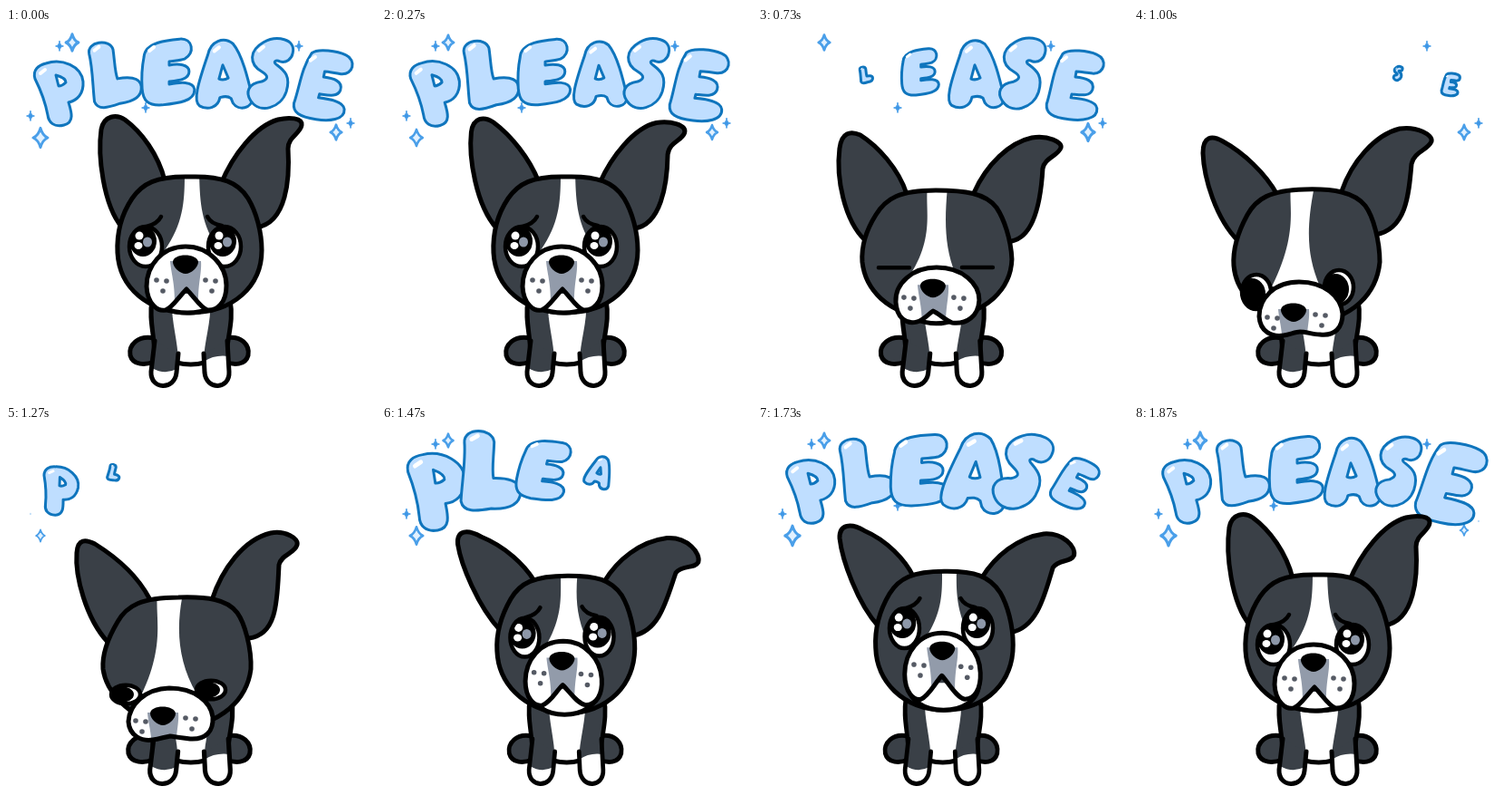
An HTML page with a canvas that plays this animation: 408x408 px, repeating every 1.94 s.

```html
<!DOCTYPE html>
<html lang="en">
<head>
<meta charset="utf-8">
<title>Please</title>
<style>
html, body { margin: 0; width: 100%; height: 100%; overflow: hidden; background: #fff }
canvas { display: block }
</style>
</head>
<body>
<canvas id="stage" width="408" height="408"></canvas>
<script>
const ctx = document.getElementById('stage').getContext('2d');
const LOOP = 1940, STEPS = 29, NUM = /-?[\d.]+/g;
const DARK = '#3a4047', BLUE = '#0f75bd', PALE = '#bfdeff';

// Each pose holds paths and points with matching structure, so any two can be blended.
const up = {
  earL: 'M128 220C107 195 101 140 105 112C108 96 122 95 131 101C150 115 168 140 175 168',
  earR: 'M237 172C250 140 275 108 300 101C312 98 327 99 326 107C325 116 311 120 311 133C313 165 310 215 276 220',
  head: 'M203 164C165 163 150 172 139 188C127 206 122 228 123 248C125 285 155 314 203 314C250 314 282 285 282 245C282 225 276 203 267 188C256 170 238 163 203 164Z',
  blaze: 'M197 160C197 190 196 215 175 245H235C214 215 214 190 213 160Z',
  muzzle: 'M198 241C172 241 155 262 155 285C156 305 168 313 176 311C183 309 191 296 199 288C207 296 215 309 222 311C233 312 243 303 243 284C243 262 224 241 198 241Z',
  chin: 'M161 293C165 321 235 321 239 293',
  nose: '198 260', dots: '172 282 226 282',
  eyes: '154 241 241 241 18 22', pupil: '-3 -6', body: '1'
};
const perk = { ...up,
  earL: 'M125 222C100 195 90 145 92 118C93 101 103 99 115 107C135 122 158 148 170 170',
  earR: 'M243 170C255 145 280 112 305 108C325 106 345 115 341 124C336 133 322 131 319 146C316 180 305 220 280 222'
};
const dip = {
  earL: 'M118 234C95 212 86 165 90 133C92 115 102 113 113 118C132 130 155 155 164 183',
  earR: 'M238 182C252 150 278 126 302 121C320 118 336 126 334 132C331 141 316 143 314 155C312 190 305 230 280 235',
  head: 'M196 179C156 179 141 188 130 206C118 225 114 243 115 258C118 285 140 318 196 320C255 318 279 285 280 255C279 232 271 210 263 198C251 182 228 179 196 179Z',
  blaze: 'M187 175C184 200 195 230 168 272H218C205 240 206 210 209 175Z',
  muzzle: 'M197 264C170 264 151 282 152 302C153 320 164 327 175 324C183 322 188 315 193 312C200 315 205 321 214 325C230 327 243 318 244 300C244 282 226 264 197 264Z',
  chin: 'M165 310C170 331 222 331 230 310',
  nose: '193 286', dots: '167 301 222 301',
  eyes: '150 264 242 264 17 20', pupil: '-3 -2', body: '1.02'
};
const down = {
  earL: 'M115 235C90 210 77 165 76 138C76 119 86 118 98 125C120 137 145 160 158 184',
  earR: 'M229 180C240 148 265 118 293 111C312 108 330 118 328 125C324 135 309 136 306 150C303 185 300 222 266 228',
  head: 'M188 178C150 179 135 188 125 206C113 228 109 248 110 262C112 285 125 312 185 328C245 322 268 290 271 258C271 235 264 208 255 196C243 181 220 177 188 178Z',
  blaze: 'M173 174C170 195 182 225 152 285H205C190 250 190 220 199 174Z',
  muzzle: 'M182 280C155 280 138 298 138 318C139 335 152 341 165 339C172 338 178 335 183 335C190 335 197 338 205 338C222 340 230 330 230 315C228 296 210 280 182 280Z',
  chin: 'M155 320C165 336 205 336 215 320',
  nose: '176 313', dots: '153 323 206 320',
  eyes: '135 291 226 286 16 19', pupil: '-5 2', body: '1'
};
const low = {
  earL: 'M112 238C88 212 76 165 78 140C79 124 88 125 98 130C122 145 145 165 158 190',
  earR: 'M227 192C238 158 262 125 292 118C308 115 323 124 321 131C318 141 304 141 301 153C299 190 300 230 268 234',
  head: 'M190 189C150 189 133 198 123 216C110 238 106 255 107 268C110 290 130 320 183 335C240 330 266 300 270 268C271 245 263 217 255 206C244 191 222 188 190 189Z',
  blaze: 'M167 185C164 210 176 240 150 295H210C190 260 187 225 195 185Z',
  muzzle: 'M180 289C153 290 136 307 135 326C136 342 150 348 162 346C169 345 175 343 181 342C188 343 194 344 203 345C220 346 229 337 228 321C226 304 208 289 180 289Z',
  chin: 'M153 328C163 342 203 342 213 328',
  nose: '173 319', dots: '149 329 204 326',
  eyes: '132 296 226 291 16 19', pupil: '-6 0', body: '1.03'
};
const stretch = {
  earL: 'M135 222C110 195 90 150 85 128C83 112 96 111 112 120C140 130 160 150 170 165',
  earR: 'M250 166C265 145 290 128 320 125C345 124 359 145 356 155C352 162 338 156 330 164C318 190 308 225 280 230',
  head: 'M208 159C172 159 157 167 147 184C135 205 131 226 132 243C133 280 160 312 207 313C255 312 281 280 281 240C281 218 275 196 267 182C255 164 240 159 208 159Z',
  blaze: 'M205 155C205 180 207 200 188 230H234C220 200 220 180 221 155Z',
  muzzle: 'M205 224C180 224 164 245 164 270C164 290 173 300 181 298C190 294 196 280 204 271C212 280 220 296 230 298C241 298 247 285 246 268C245 245 228 224 205 224Z',
  chin: 'M167 280C164 324 248 324 245 280',
  nose: '205 243', dots: '180 262 231 265',
  eyes: '164 217 243 217 16 22', pupil: '-2 -6', body: '.93'
};
const poses = [[0, up], [530, perk], [600, perk], [730, dip], [870, down], [1000, down],
  [1270, low], [1330, low], [1530, stretch], [1610, stretch], [1800, up], [LOOP, up]];
const lids = [[0, 1], [600, 1], [730, 0], [800, 0], [900, 1], [1170, 1], [1270, .55],
  [1335, 0], [1400, 0], [1470, 1], [LOOP, 1]];
const pop = [[0, 0], [30, .25], [110, .75], [190, 1.18], [300, 1.2], [370, 1.02], [400, 1]];

// centre, shine, time it starts to vanish, outline with any counter
const letters = [
  [57, 70, 40, 48, 530, 'M44 39C62 33 83 42 85 59C86 73 78 80 69 82C72 92 76 104 64 107C53 110 47 104 46 96C43 80 38 68 32 56C29 46 36 41 44 39ZM55 52Q66 55 66 60Q62 64 58 64Z'],
  [119, 52, 99, 22, 600, 'M91 28C88 14 114 10 118 23C120 37 120 48 123 56C133 54 149 53 150 65C151 77 141 82 126 84C112 89 101 92 97 82C95 65 95 44 91 28Z'],
  [179, 48, 160, 23, 685, 'M152 32C153 15 180 13 192 12C206 11 209 28 197 34C191 36 184 36 180 37L180 41C190 39 202 40 202 48C202 57 190 58 180 59L180 62C191 60 207 58 208 68C208 81 190 83 172 85C156 86 151 80 150 67C149 52 150 42 152 32Z'],
  [240, 50, 232, 24, 770, 'M223 30C226 15 240 10 250 18C260 30 266 55 271 76C271 88 256 91 250 82L248 77C244 74 240 75 236 76C234 87 223 90 214 85C207 80 212 62 223 30ZM239 41L235 56Q240 58 245 55Z'],
  [291, 50, 281, 23, 860, 'M316 28C320 12 298 8 284 16C268 25 268 40 282 48C290 53 289 56 282 59C267 61 264 71 270 80C280 95 303 88 309 70C314 53 307 47 299 41C293 37 298 35 302 37C309 39 315 34 316 28Z'],
  [349, 62, 337, 34, 880, 'M336 28C343 22 365 25 374 29C386 34 383 51 369 50C360 49 355 48 351 48L350 54C361 55 372 58 369 68C366 76 356 74 346 73L345 77C356 78 373 80 374 89C375 101 357 103 343 101C324 99 317 94 318 84C324 65 325 45 336 28Z']
];
// x, y, half height, vanish time, return time
const sparkles = [
  [73, 16, 9, 740, 1320], [38, 121, 11, 540, 1170], [364, 115, 9.5, 1010, 1780],
  [59, 20, 5.5, 620, 1320], [27, 97, 5.5, 540, 1250], [154, 88, 5.5, 770, 1530],
  [323, 20, 5.5, 1010, 1680], [380, 105, 5.5, 1010, 1850]
];

const clamp = v => Math.max(0, Math.min(1, v));
const nums = s => s.match(NUM).map(Number);

function mix(a, b, k) {
  if (typeof a === 'number') return a + (b - a) * k;
  const to = nums(b);
  let i = 0;
  return a.replace(NUM, v => (+v + (to[i++] - v) * k).toFixed(2));
}

function span(keys, t) {
  const i = Math.max(1, keys.findIndex(k => k[0] > t));
  const [t0, a] = keys[i - 1], [t1, b] = keys[i];
  return [a, b, clamp((t - t0) / (t1 - t0))];
}

const track = (keys, t) => t >= keys[keys.length - 1][0] ? keys[keys.length - 1][1] : mix(...span(keys, t));

function poseAt(t) {
  const [a, b, k] = span(poses, t), ease = k * k * (3 - 2 * k), out = {};
  for (const key in a) out[key] = mix(a[key], b[key], ease);
  return out;
}

function shape(d, fill, line = '#000', width = 5) {
  const p = new Path2D(d);
  if (fill) { ctx.fillStyle = fill; ctx.fill(p, 'evenodd'); }
  if (line) { ctx.strokeStyle = line; ctx.lineWidth = width; ctx.stroke(p); }
}

function oval(x, y, rx, ry, fill) {
  ctx.fillStyle = fill;
  ctx.beginPath();
  ctx.ellipse(x, y, rx, ry, 0, 0, 7);
  ctx.fill();
}

function group(draw, x = 0, y = 0, sx = 1, sy = sx) {
  ctx.save();
  ctx.translate(x, y);
  ctx.scale(sx, sy);
  draw();
  ctx.restore();
}

function drawBody() {
  shape('M164 342C145 338 135 350 137 361C140 372 154 372 163 368Z', DARK);
  shape('M241 342C260 338 269 350 267 361C264 372 251 372 242 368Z', DARK);
  shape('M161 300C157 325 165 340 164 369H243C242 345 252 325 247 300Z', DARK);
  shape('M183 300C182 325 190 345 190 370H218C218 345 227 325 225 300Z', '#fff', null);
  shape('M188 369Q204 373 219 369', null);
  const left = 'M164 345L160 379C159 399 186 400 188 380L190 359';
  const right = 'M218 359L219 380C221 400 247 399 246 379L244 345';
  shape(left, DARK, null);
  shape(right, DARK, null);
  shape('M161 375Q175 383 188 376V380C186 400 159 399 160 379Z', '#fff', null);
  shape('M218 368Q230 360 245 362L246 379C247 399 221 400 219 380Z', '#fff', null);
  shape(left);
  shape(right);
}

function drawEye(x, y, rx, ry, px, py, open, sad) {
  const ball = new Path2D();
  ball.ellipse(x, y, rx, ry * open, 0, 0, 7);
  ctx.fillStyle = '#fff';
  ctx.fill(ball);
  ctx.save();
  ctx.clip(ball);
  group(() => {
    oval(px, py, 15, 17, '#000');
    if (!sad) return;
    oval(px - 4, py - 6, 4.5, 4.5, '#fff');
    oval(px - 5, py + 5, 4.5, 4, '#fff');
    oval(px + 5, py + 1, 5, 5.5, '#8d97a8');
  }, x, y, 1, open);
  ctx.restore();
  ctx.lineWidth = 4.5;
  ctx.strokeStyle = '#000';
  ctx.stroke(ball);
}

function drawDog(t) {
  const p = poseAt(t), open = track(lids, t), sad = t < 730 || t > 1370;
  shape(p.earL, DARK);
  shape(p.earR, DARK);
  group(drawBody, 203 * (1 - p.body), 0, +p.body, 1);

  shape(p.head, DARK, null);
  ctx.save();
  ctx.clip(new Path2D(p.head));
  shape(p.blaze, '#fff', null);
  ctx.restore();
  shape(p.head);

  const [lx, ly, rx, ry, w, h] = nums(p.eyes), [px, py] = nums(p.pupil);
  drawEye(lx, ly, w, h, px, py, open, sad);
  drawEye(rx, ry, w, h, px + 1, py, open, sad);
  if (sad && open > .5) {
    group(() => shape('M1 -22Q13 -25 17 -33', null, '#000', 4.5), lx, ly);
    group(() => shape('M-19 -33Q-15 -25 -3 -23', null, '#000', 4.5), rx, ry);
  }

  const [nx, ny] = nums(p.nose), [ax, ay, bx, by] = nums(p.dots);
  shape(p.chin, '#fff');
  shape(p.muzzle, '#fff', null);
  ctx.save();
  ctx.clip(new Path2D(p.muzzle));
  group(() => shape('M-17 -3C-16 10 -12 20 -12 42H14C14 20 18 10 17 -3Z', '#929baa', null), nx, ny);
  ctx.restore();
  shape(p.muzzle);
  group(() => shape('M-14 -2C-14 -12 13 -12 14 -2C14 4 6 11 0 11C-6 11 -14 4 -14 -2Z', '#000', null), nx, ny);
  for (const [x, y] of [[ax, ay], [bx, by]])
    for (const [dx, dy] of [[-6, -4], [5, -3], [1, 8]]) oval(x + dx, y + dy, 2.8, 2.8, '#555a64');
}

function drawText(t) {
  letters.forEach(([x, y, hx, hy, gone, d], i) => {
    // Time since the letter began to pop in, counted across the loop seam.
    const age = (t < 1100 ? t + LOOP : t) - (1160 + 82 * i);
    const leave = t < 1100 ? clamp(1 - (t - gone) / 180) : 1;
    const sway = 1 + .025 * Math.sin(6 * Math.PI * t / LOOP - i * 1.5);
    const s = track(pop, age) * leave * sway;
    if (s < .02) return;
    group(() => {
      ctx.rotate(.4 * clamp(1 - age / 400));
      ctx.translate(-x, -y);
      shape(d, PALE, BLUE, 3 / s);
      shape(`M${hx - 2} ${hy + 2}L${hx + 3} ${hy - 2}`, null, '#fff', 4);
    }, x, y, s);
  });
}

function drawSparkles(t) {
  sparkles.forEach(([x, y, r, gone, back], i) => {
    const big = r > 7;
    let s = t < 1130 ? clamp(1 - (t - gone) / 110) : clamp((t - back) / 140);
    if (t < 200 && back + 140 > LOOP) s = clamp((t + LOOP - back) / 70);
    s *= big ? .92 + .1 * Math.cos(4 * Math.PI * t / LOOP + i) : 1;
    if (s < .02) return;
    const w = r * (big ? .75 : .8), c = r * (big ? .22 : .1);
    group(() => shape(
      `M0 ${-r}Q${c} ${-c} ${w} 0Q${c} ${c} 0 ${r}Q${-c} ${c} ${-w} 0Q${-c} ${-c} 0 ${-r}Z`,
      big ? '#e2f1ff' : '#3f97e6', '#4a9fe9', big ? 3 : 1), x, y, s);
  });
}

function frame(now) {
  // The motion advances in even steps, about fifteen a second.
  const step = Math.min(STEPS - 1, Math.floor((now % LOOP + 8) / LOOP * STEPS));
  const t = step * LOOP / STEPS;
  ctx.fillStyle = '#fff';
  ctx.fillRect(0, 0, 408, 408);
  ctx.lineCap = ctx.lineJoin = 'round';
  drawSparkles(t);
  drawText(t);
  drawDog(t);
}

const start = performance.now();
(function tick() {
  frame(performance.now() - start);
  requestAnimationFrame(tick);
})();
</script>
</body>
</html>
```
